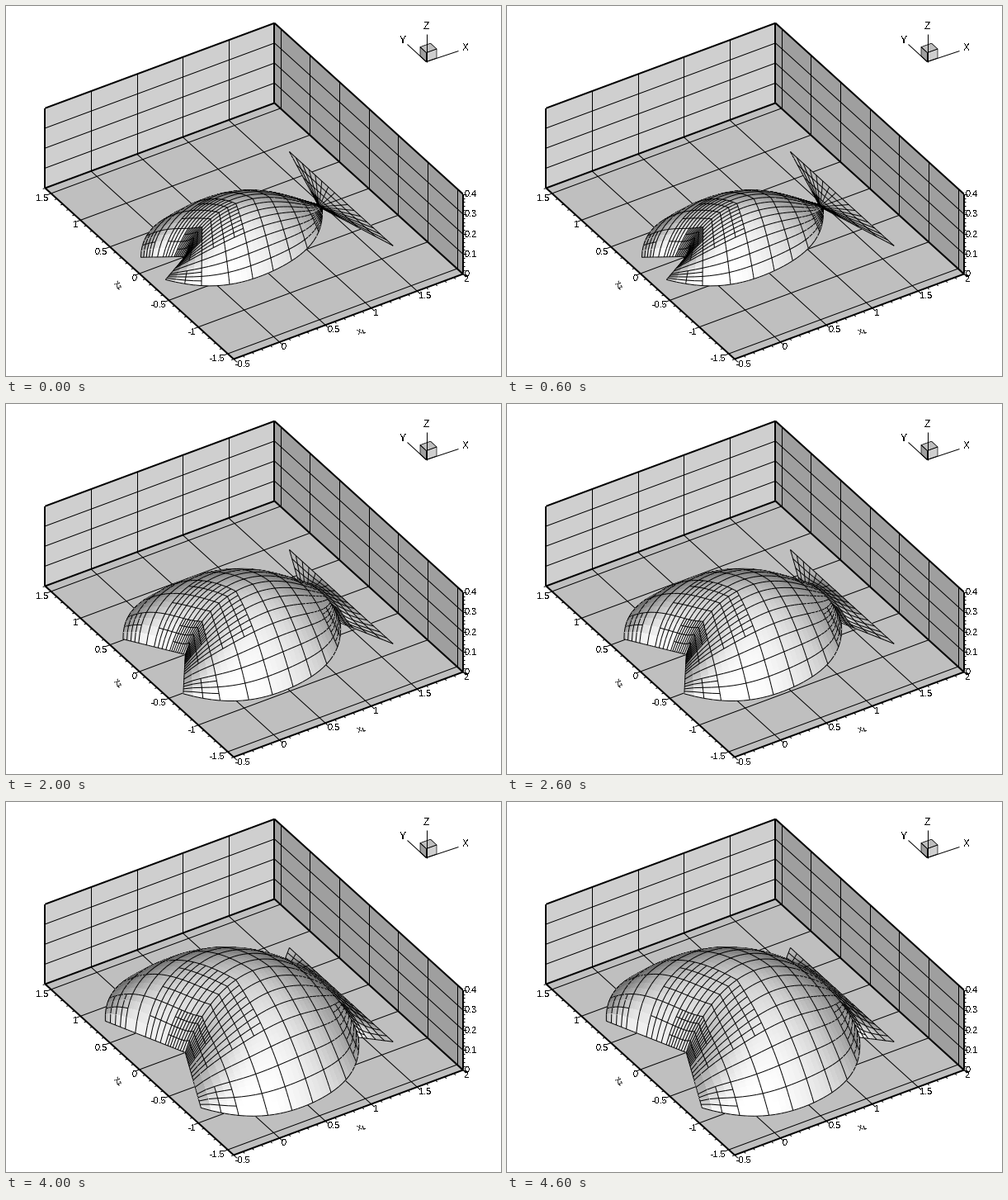
Write a matplotlib script that moves like this. It is 600 by 448 pixels and loops after 5 s.

```python
import numpy as np
import matplotlib.pyplot as plt
from matplotlib.animation import FuncAnimation
from matplotlib.collections import LineCollection, PolyCollection

W, H, DPI = 600, 448, 100
PX = 72 / DPI
plt.rcParams["font.family"] = "Liberation Sans"
plt.rcParams["text.antialiased"] = False

# Orthographic view: screen vectors of the axes and the direction to the eye
ORIGIN = np.array([216.8, 302.9])
EX, EY, EZ = np.array([[111.2, -41.2], [-71.4, -64.7], [0, -242.0]])
EYE = np.array([-0.440, -0.685, 0.581])
Z_SCALE = 2.25

X_LO, X_HI, Y_LO, Y_HI, Z_HI = -0.5, 2.0, -1.6, 1.6, 0.4
FLOOR, LEFT, RIGHT = "#bfbfbf", "#cfcfcf", "#9f9f9f"

# Mesh: coarse cells along the body, in the tail and across one half
BODY, TAIL, HALF, SUB = 8, 4, 8, 4
NU, NV = (BODY + TAIL) * SUB, HALF * SUB
X_MOUTH, X_NECK, X_END, W_END = -0.35, 1.47, 1.70, 0.88
OUTLINE = np.polyfit([-0.35, -0.04, 0.34, 0.835, 1.225, 1.4, 1.47],
                     [0.21, 0.52, 0.634, 0.5625, 0.347, 0.148, 0.035], 4)


def project(x, y, z):
    x, y, z = (np.asarray(c, float)[..., None] for c in (x, y, z))
    return ORIGIN + x * EX + y * EY + z * EZ


# ---------- surface ----------
def half_width(x, k):
    swell = 0.1525 * k * (1 + 0.1 * (1 - ((x - 0.6) / 0.9) ** 2))
    return np.maximum(np.polyval(OUTLINE, x) + swell, 0.02)


def half_grid(k):
    """Node positions of the half domain x2 >= 0."""
    u = np.arange(NU + 1)[:, None] / SUB
    v = np.linspace(0, 1, NV + 1)[None, :]
    knots = [0, BODY, BODY + TAIL]
    axis = np.interp(u, knots, [0, X_NECK, X_END])
    rim = np.interp(u, knots, [X_MOUTH, X_NECK, X_END])
    neck = half_width(X_NECK, k)
    width = np.where(u <= BODY, half_width(rim, k),
                     np.interp(u, knots, [0, neck, W_END]))
    return axis + (rim - axis) * v, width * v


def membrane(x, y):
    """Linear finite elements for a membrane held at its rim, body loaded."""
    idx = np.arange(x.size).reshape(x.shape)
    a, b = idx[:-1, :-1].ravel(), idx[1:, :-1].ravel()
    c, d = idx[1:, 1:].ravel(), idx[:-1, 1:].ravel()
    tri = np.vstack([np.c_[a, b, c], np.c_[a, c, d]])
    px, py = x.ravel()[tri], y.ravel()[tri]
    gx = np.roll(py, -1, 1) - np.roll(py, -2, 1)
    gy = np.roll(px, -2, 1) - np.roll(px, -1, 1)
    area = np.abs(gx[:, 0] * gy[:, 1] - gx[:, 1] * gy[:, 0]) / 2 + 1e-12
    local = gx[:, :, None] * gx[:, None, :] + gy[:, :, None] * gy[:, None, :]
    local /= 4 * area[:, None, None]
    force = area / 3 * (px.mean(1) < X_NECK)
    stiff, load = np.zeros((x.size, x.size)), np.zeros(x.size)
    np.add.at(stiff, (tri[:, :, None], tri[:, None, :]), local)
    np.add.at(load, tri, np.repeat(force[:, None], 3, 1))
    free = idx[1:-1, :-1].ravel()
    z = np.zeros(x.size)
    z[free] = np.linalg.solve(stiff[np.ix_(free, free)], load[free])
    return z.reshape(x.shape)


def surface(k):
    x, y = half_grid(k)
    z = membrane(x, y)
    # scale the load so that the crown reaches its height on the screen
    crown = 222.3 - 11.8 * k
    room = project(x, y, 0 * x)[..., 1] - crown
    part = np.s_[1:(BODY - 1) * SUB, :-1]
    z = z * np.min(room[part] / (-EZ[1] * z[part]))
    mirror = lambda a, s: np.hstack([s * a[:, :0:-1], a])
    return mirror(x, 1), mirror(y, -1), mirror(z, 1)


def line_steps():
    """Line spacing of every fine cell; finer at the mouth and neck corners."""
    u = ((np.arange(NU) + 0.5) / SUB)[:, None]
    v = np.abs((np.arange(2 * NV) + 0.5) / NV - 1)[None, :]
    fine = ((u < 3) & (v < 0.5) | (u < 1) & (v > 0.75)
            | (np.abs(u - BODY) < 1) & (v > 0.5))
    finest = (u < 1) & (v < 0.25)
    return np.where(finest, 1, np.where(fine, 2, 4))


def kept_lines(step):
    edge = np.pad(step, ((1, 1), (0, 0)), mode="edge")
    near = np.minimum(edge[:-1], edge[1:])
    return np.arange(len(near))[:, None] % near == 0


def build(k):
    x, y, z = surface(k)
    flat = project(x, y, z)
    solid = np.stack([x, y, z * Z_SCALE], -1)
    depth = solid @ EYE

    quads = np.stack([flat[:-1, :-1], flat[1:, :-1],
                      flat[1:, 1:], flat[:-1, 1:]], 2).reshape(-1, 4, 2)
    far = (depth[:-1, :-1] + depth[1:, :-1] + depth[1:, 1:]
           + depth[:-1, 1:]).ravel() / 4
    normal = np.cross(solid[1:, 1:] - solid[:-1, :-1],
                      solid[:-1, 1:] - solid[1:, :-1]).reshape(-1, 3)
    normal *= np.where(normal[:, 2:] < 0, -1, 1)
    normal /= np.linalg.norm(normal, axis=1, keepdims=True) + 1e-15
    shade = np.clip((74 + 188 * np.clip(normal @ EYE, 0, 1)) / 255, 0, 1)

    step = line_steps()
    across, along = kept_lines(step), kept_lines(step.T).T
    segs = np.vstack([np.stack([flat[:, :-1], flat[:, 1:]], 2)[across],
                      np.stack([flat[:-1], flat[1:]], 2)[along]])
    seg_far = np.r_[((depth[:, :-1] + depth[:, 1:]) / 2)[across],
                    ((depth[:-1] + depth[1:]) / 2)[along]] + 0.05

    n, m = len(quads), len(segs)
    face, edge = np.zeros((n + m, 4)), np.zeros((n + m, 4))
    face[:n, :3], face[:n, 3] = shade[:, None], 1
    edge[n:, 3] = 1
    order = np.argsort(np.r_[far, seg_far])
    shapes = list(quads) + list(segs)
    return [shapes[i] for i in order], face[order], edge[order], order >= n


# ---------- box, axes, triad ----------
fig = plt.figure(figsize=(W / DPI, H / DPI), dpi=DPI, facecolor="white")
ax = fig.add_axes([0, 0, 1, 1])
ax.set_xlim(-0.5, W - 0.5)
ax.set_ylim(H - 0.5, -0.5)
ax.axis("off")


def lines(segs, width=1, z=2):
    ax.add_collection(LineCollection(segs, colors="k", linewidths=width * PX,
                                     zorder=z))


def panel(points, color, z=1):
    ax.add_collection(PolyCollection([points], facecolors=color,
                                     edgecolors="none", antialiaseds=False,
                                     zorder=z))


def label(x, y, s, ha="center", size=11, **kw):
    ax.text(x, y, s, ha=ha, va="center", fontsize=size * PX, zorder=6, **kw)


def seg(p, q):
    return np.array([project(*p), project(*q)])


def draw_box():
    front, left = (X_LO, Y_LO, 0), (X_LO, Y_HI, 0)
    right, back = (X_HI, Y_LO, 0), (X_HI, Y_HI, 0)
    top = lambda p: (p[0], p[1], Z_HI)
    for corners, color in (((front, right, back, left), FLOOR),
                           ((left, back, top(back), top(left)), LEFT),
                           ((right, back, top(back), top(right)), RIGHT)):
        panel(np.array([project(*p) for p in corners]), color)

    grid = []
    for x in np.arange(0, 2, 0.5):
        grid += [seg((x, Y_LO, 0), (x, Y_HI, 0)),
                 seg((x, Y_HI, 0), (x, Y_HI, Z_HI))]
    for y in np.arange(-1.5, 1.6, 0.5):
        grid += [seg((X_LO, y, 0), (X_HI, y, 0)),
                 seg((X_HI, y, 0), (X_HI, y, Z_HI))]
    for z in (0.1, 0.2, 0.3):
        grid += [seg((X_LO, Y_HI, z), (X_HI, Y_HI, z)),
                 seg((X_HI, Y_HI, z), (X_HI, Y_LO, z))]
    lines(grid)
    lines([seg(front, right), seg(front, left), seg(left, back),
           seg(back, right), seg(top(left), top(back)),
           seg(top(back), top(right)), seg(left, top(left)),
           seg(back, top(back)), seg(right, top(right))], 2, 3)


def draw_axes():
    ticks = []

    def rule(values, place, way, major):
        for v in values:
            p = project(*place(v))
            on = abs(v / major - round(v / major)) < 1e-6
            ticks.append([p, p + np.array(way) * (1 if on else 0.55)])

    on_x = lambda v: (v, Y_LO, 0)
    on_y = lambda v: (X_LO, v, 0)
    on_z = lambda v: (X_HI, Y_LO, v)
    rule(np.arange(-5, 21) / 10, on_x, (4, 3.6), 0.5)
    rule(np.arange(-16, 17) / 10, on_y, (-5, 1.9), 0.5)
    rule(np.arange(0, 21) / 50, on_z, (4, 0), 0.1)
    lines(ticks)

    for v in np.arange(-0.5, 2.1, 0.5):
        p = project(*on_x(v))
        label(p[0] + 2, p[1] + 6, f"{v:g}", "left")
    for v in np.arange(-1.5, 1.6, 0.5):
        p = project(*on_y(v))
        label(p[0] - 3, p[1] + 6, f"{v:g}", "right")
    for v in np.arange(5) / 10:
        p = project(*on_z(v))
        label(p[0] + 2, p[1] + 0.5, f"{v:g}", "left")
    label(430, 394, r"$\mathregular{x_1}$", size=10, rotation=20)
    label(134, 338, r"$\mathregular{x_2}$", size=10, rotation=-42)


def draw_triad():
    o = np.array([509, 67])
    a, b, c = np.array([[12.5, -4.5], [-7.5, -6.8], [0, -11]])
    faces = (([c, c + a, c + a + b, c + b], FLOOR),
             ([0 * a, a, a + c, c], LEFT),
             ([0 * b, b, b + c, c], RIGHT))
    for corners, color in faces:
        pts = o + np.array(corners)
        panel(pts, color, 2)
        lines([np.vstack([pts, pts[:1]])], 0.7, 3)
    lines([[o, (548, 54)], [o, (486, 46)], [o, (509, 33)]], 1, 4)
    for x, y, s in ((556, 50, "X"), (480, 41, "Y"), (509, 24, "Z")):
        label(x, y, s, size=12)


draw_box()
draw_axes()
draw_triad()

STAGES = [build(k) for k in range(5)]
mesh = PolyCollection([], linewidths=PX, zorder=5)
ax.add_collection(mesh)


def update(k):
    shapes, face, edge, smooth = STAGES[k]
    mesh.set_verts(shapes, closed=False)
    mesh.set_facecolor(face)
    mesh.set_edgecolor(edge)
    mesh.set_antialiased(smooth.tolist())
    return [mesh]


anim = FuncAnimation(fig, update, frames=len(STAGES), interval=1000,
                     init_func=lambda: update(0), repeat=True, repeat_delay=0)
plt.show()
```
